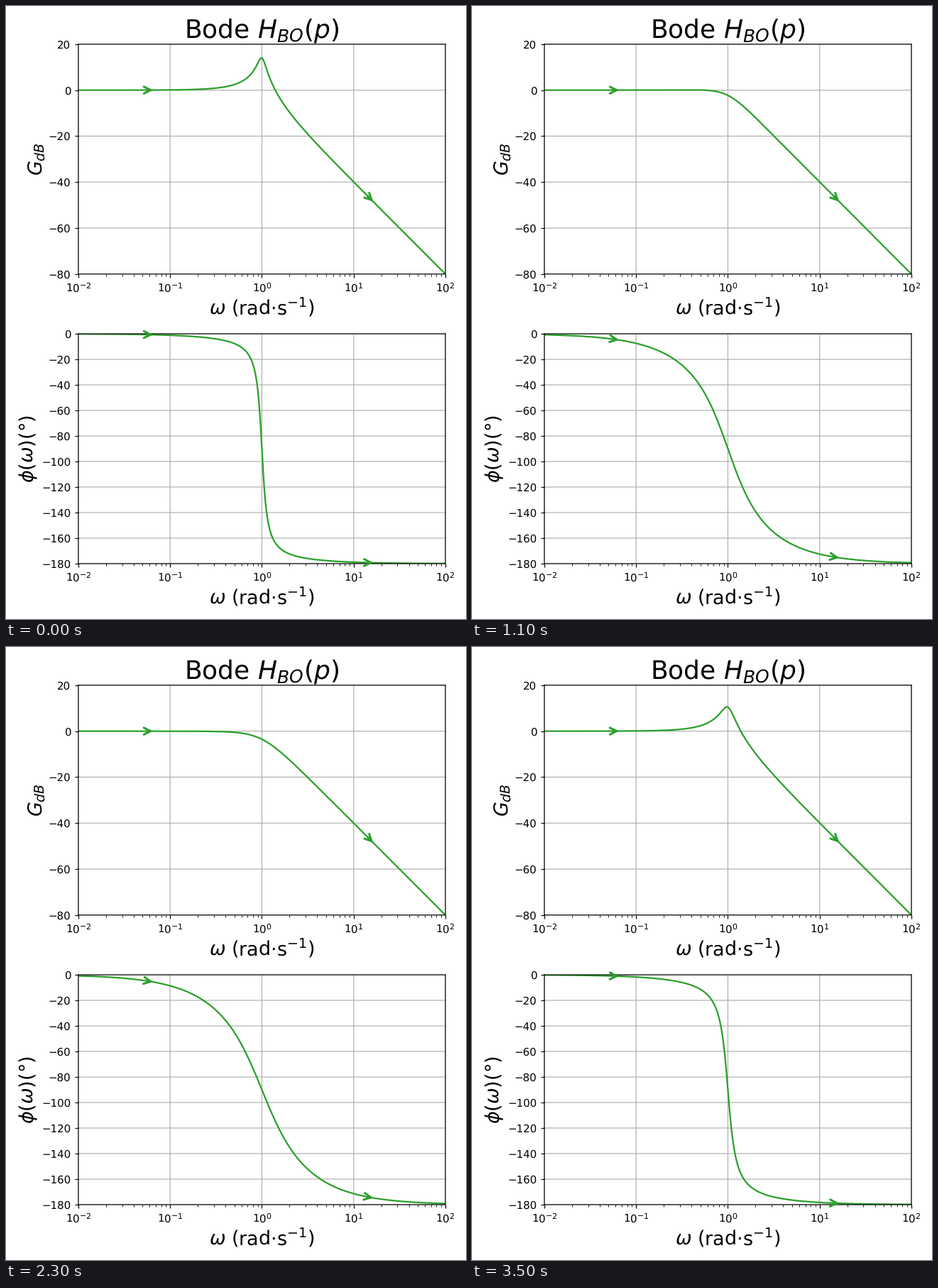
Animation, 648 px wide and 864 px high, one loop 3.6 s. Source, as a matplotlib script:

```python
import numpy as np
import matplotlib.pyplot as plt
from matplotlib.animation import FuncAnimation

W, H, DPI = 648, 864, 108
FRAMES, STEP = 36, 100
GREEN = "tab:green"
ARROW_EXP = (-1.186, 1.214)   # decades where the arrow tips sit
TAIL = 0.06                   # arrow shaft length in decades

# Smooth, unhinted rendering
plt.rcParams.update({"text.hinting": "none", "text.hinting_factor": 1,
                     "path.snap": False})

omega = np.logspace(-2, 2, 2000)


def damping(i):
    """Triangle wave between 0.1 and 1."""
    return 1 - 0.05 * abs(i % FRAMES - FRAMES // 2)


def response(w, xi):
    h = 1 / (1 - w**2 + 2j * xi * w)
    return 20 * np.log10(np.abs(h)), np.degrees(np.angle(h))


fig, axes = plt.subplots(2, 1, figsize=(W / DPI, H / DPI), dpi=DPI)
fig.subplots_adjust(left=101.9 / W, right=619 / W, bottom=1 - 786 / H,
                    top=1 - 53.8 / H, hspace=84.2 / 324)

axes[0].set_title("Bode $H_{BO}(p)$", fontsize=24)
limits = ((-80, 20), (-180, 0))
labels = ("$G_{dB}$", r"$\phi(\omega)$(°)")

curves, arrows = [], []
for ax, (low, high), label in zip(axes, limits, labels):
    ax.set_xscale("log")
    ax.set_xlim(0.01, 100)
    ax.set_ylim(low, high)
    ax.set_yticks(range(low, high + 1, 20))
    ax.grid(True)
    ax.set_xlabel(r"$\omega$ (rad·s$^{-1}$)", fontsize=18, labelpad=1)
    ax.set_ylabel(label, fontsize=18, labelpad=2)
    curves += ax.plot([], [], color=GREEN, lw=1.5)
    arrows.append([
        ax.annotate("", xy=(1, low), xytext=(1, low),
                    arrowprops=dict(arrowstyle="->", color=GREEN, lw=2,
                                    mutation_scale=16, shrinkA=0, shrinkB=0))
        for _ in ARROW_EXP])


def update(i):
    xi = damping(i)
    for k, values in enumerate(response(omega, xi)):
        curves[k].set_data(omega, values)
        for arrow, e in zip(arrows[k], ARROW_EXP):
            ends = 10 ** np.array([e - TAIL, e])
            y = response(ends, xi)[k]
            arrow.xyann = (ends[0], y[0])
            arrow.xy = (ends[1], y[1])
    return curves + arrows[0] + arrows[1]


anim = FuncAnimation(fig, update, frames=FRAMES, interval=STEP,
                     repeat=True, repeat_delay=0, blit=False)
plt.show()
```
